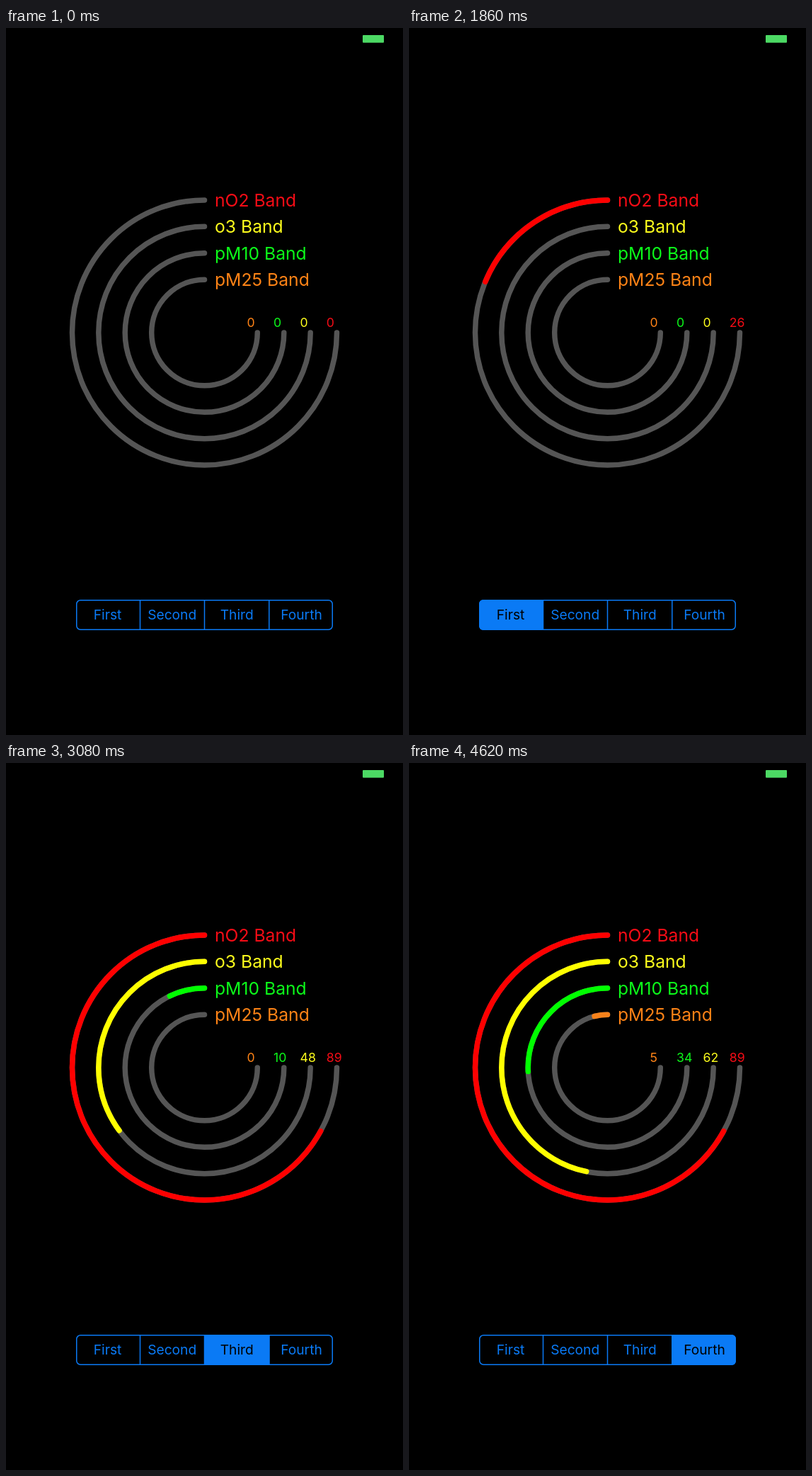
Animation, 561 px wide and 998 px high, one loop 4640 ms. Source, as an HTML page:

```html
<!DOCTYPE html>
<html lang="en">
<head>
<meta charset="utf-8">
<title>Band rings</title>
<style>
  html, body { margin: 0; width: 100%; height: 100%; overflow: hidden; background: #000; }
  svg { display: block; width: 100vw; height: 100vh; }
  text { font-family: Inter, Roboto, sans-serif; }
  .label { font-size: 24.7px; }
  .value { font-size: 17.7px; }
  .tab { font-size: 19.2px; text-anchor: middle; }
  .track, .arc { fill: none; stroke-width: 7.5; stroke-linecap: round; }
  .track { stroke: #555; }
</style>
</head>
<body>
<svg id="stage" viewBox="0 0 561 998">
  <defs>
    <clipPath id="pill"><rect x="99" y="807" width="363" height="43" rx="6"/></clipPath>
  </defs>
  <rect width="561" height="998"/>
  <rect x="504" y="10" width="30" height="10.7" rx="1" fill="#4cd964"/>
  <g id="rings"></g>
  <g id="fills" clip-path="url(#pill)"></g>
  <g fill="none" stroke="#0a7af5" stroke-width="1.5">
    <rect x="99.75" y="807.75" width="361.5" height="41.5" rx="5.5"/>
    <path d="M189.5 807V850M280.5 807V850M371.8 807V850"/>
  </g>
  <g id="tabs"></g>
</svg>
<script>
const LOOP = 4640, CX = 280.5, CY = 430;

// arc and count: alternating time (ms) and percentage
const rings = [
  { name: 'nO2 Band', r: 187, color: '#f00', ink: '#f60c16',
    arc: [1527, 0, 1860, 24.9, 2400, 65.3, 2700, 88, 2770, 89.4],
    count: [1500, 0, 2700, 89.5] },
  { name: 'o3 Band', r: 149.7, color: '#ff0', ink: '#ffff1c',
    arc: [2178, 0, 2740, 29.1, 3300, 58.2, 3400, 62.4],
    count: [2152, 0, 2400, 12.7, 2740, 31.2, 3300, 59.6, 3355, 62.4] },
  { name: 'pM10 Band', r: 112.3, color: '#0f0', ink: '#0cfa1a',
    arc: [2736, 0, 3300, 15.7, 3940, 34.4],
    count: [2700, 0, 3900, 34.5] },
  { name: 'pM25 Band', r: 74.8, color: '#f7821b', ink: '#ff8316',
    arc: [3292, 0, 4500, 5.3],
    count: [3270, 0, 4470, 5.3] }
];
const tabs = [
  { name: 'First', x: 99, w: 91, mid: 143.5, at: 1440 },
  { name: 'Second', x: 189, w: 92, mid: 234.7, at: 2085 },
  { name: 'Third', x: 280, w: 92.5, mid: 326.2, at: 2590 },
  { name: 'Fourth', x: 371, w: 91, mid: 417.5, at: 3140 }
];
const FADE_IN = 100, FADE_OUT = 165;

const $ = id => document.getElementById(id);
const clamp = x => Math.min(1, Math.max(0, x));

function add(parent, tag, attrs, text = '') {
  const el = document.createElementNS('http://www.w3.org/2000/svg', tag);
  for (const key in attrs) el.setAttribute(key, attrs[key]);
  el.textContent = text;
  return parent.appendChild(el);
}

function sample(keys, t) {
  if (t <= keys[0]) return keys[1];
  for (let i = 2; i < keys.length; i += 2) {
    if (t < keys[i]) {
      const u = (t - keys[i - 2]) / (keys[i] - keys[i - 2]);
      return keys[i - 1] + u * (keys[i + 1] - keys[i - 1]);
    }
  }
  return keys[keys.length - 1];
}

for (const ring of rings) {
  const { r, ink } = ring, g = $('rings');
  const d = `M${CX} ${CY - r}A${r} ${r} 0 1 0 ${CX + r} ${CY}`;
  add(g, 'path', { class: 'track', d });
  ring.path = add(g, 'path', { class: 'arc', d, stroke: ring.color, pathLength: 100 });
  add(g, 'text', { class: 'label', x: 295, y: CY - r + 9, fill: ink }, ring.name);
  ring.value = add(g, 'text', { class: 'value', x: CX + r - 14.7, y: 422.2, fill: ink }, '0');
}

for (const tab of tabs) {
  tab.fill = add($('fills'), 'rect', { x: tab.x, y: 807, width: tab.w, height: 43, fill: '#0a7af5' });
  tab.text = add($('tabs'), 'text', { class: 'tab', x: tab.mid, y: 835 }, tab.name);
}

function draw(t) {
  for (const { path, value, arc, count } of rings) {
    path.style.visibility = t >= arc[0] ? 'visible' : 'hidden';
    path.setAttribute('stroke-dasharray', `${Math.max(0.01, sample(arc, t))} 200`);
    value.textContent = Math.floor(sample(count, t));
  }
  tabs.forEach((tab, i) => {
    const next = tabs[i + 1];
    const on = clamp((t - tab.at) / FADE_IN);
    const off = next ? clamp((t - next.at) / FADE_OUT) : 0;
    const a = on * (1 - off);
    tab.fill.setAttribute('opacity', a);
    tab.text.setAttribute('fill', `rgb(${10 * (1 - a)},${122 * (1 - a)},${245 * (1 - a)})`);
  });
}

function tick() {
  draw(performance.now() % LOOP);
  requestAnimationFrame(tick);
}
tick();
</script>
</body>
</html>
```
